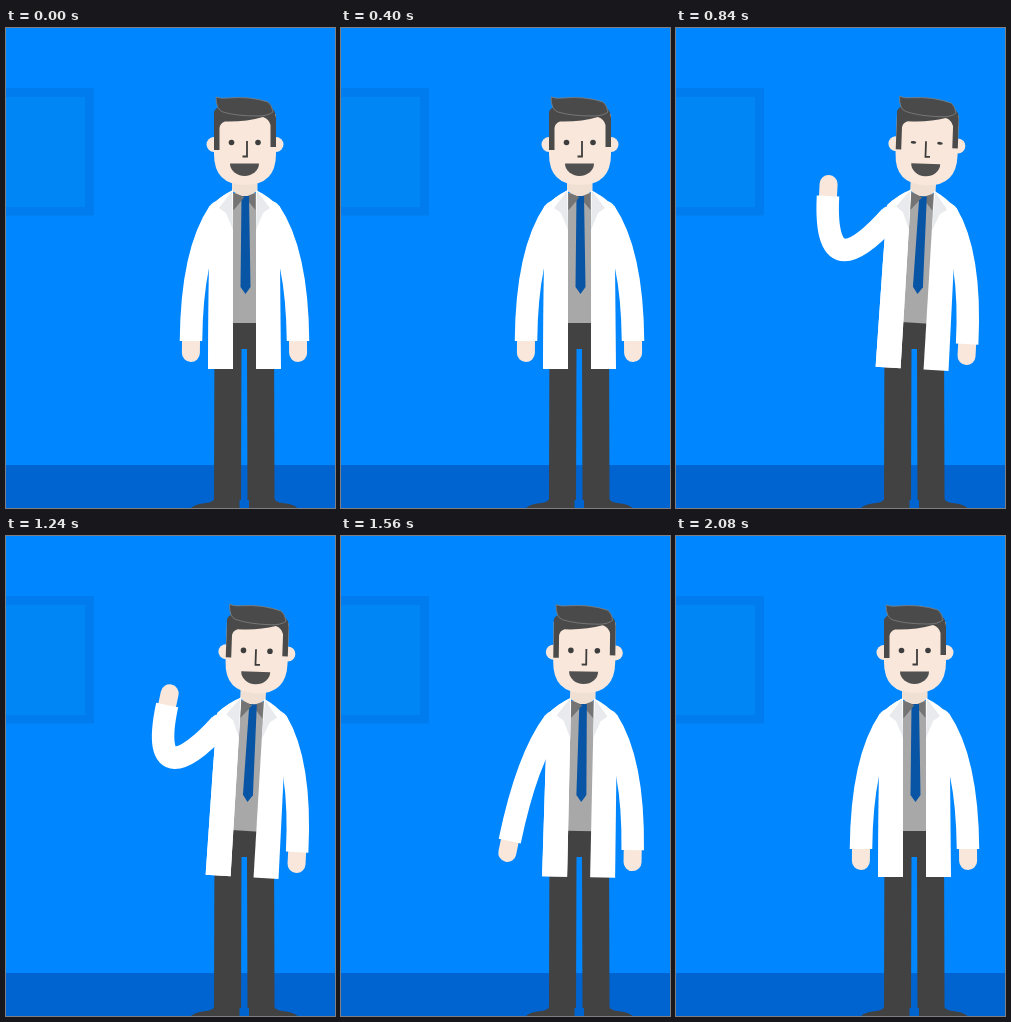
Recreate the animation shown at these times as an HTML page. Size 329 by 480 pixels, loop 2320 ms.

```html
<!DOCTYPE html>
<html lang="en">
<head>
<meta charset="utf-8">
<title>Waving doctor</title>
<style>
  html, body { margin: 0; width: 100%; height: 100%; overflow: hidden; background: #0087ff; }
  svg { display: block; }
  .sleeve { fill: none; stroke: #fff; stroke-width: 22.5; }
  .hand { fill: none; stroke: #f8e7da; stroke-width: 18; stroke-linecap: round; }
</style>
</head>
<body>
<svg width="329" height="480" viewBox="0 0 329 480">
  <defs>
    <g id="half">
      <path fill="#fff" d="M227 162Q213 169 204 179L203 235L202 341H227Z"/>
      <path fill="#e8eaed" d="M226 163L213 180L220 185L227 202Z"/>
      <path fill="#747474" d="M227.500 165L238.500 169L227.500 182Z"/>
    </g>
    <g id="leg" fill="#424242">
      <path d="M208.500 292H239V321H235.500L235 472H208Z"/>
      <path d="M185 480Q189 476 200 475Q207 474 208 471H233.500V480Z"/>
    </g>
  </defs>

  <rect width="329" height="480" fill="#0087ff"/>
  <rect y="60" width="88" height="127.500" fill="#007cee"/>
  <rect y="69" width="79" height="110" fill="#0086f5"/>
  <rect y="437" width="329" height="43" fill="#0064d0"/>

  <use href="#leg"/>
  <use href="#leg" transform="translate(476.500) scale(-1 1)"/>

  <g id="body">
    <path fill="#a8a8a8" d="M225 165H253V295H225Z"/>
    <path fill="#f0e0d4" d="M226 145H251.500V163L239 170L226 163Z"/>
    <g id="rightArm" transform="translate(477) scale(-1 1)"></g>
    <use href="#half"/>
    <use href="#half" transform="translate(477) scale(-1 1)"/>
    <path fill="#0854a5" d="M235.500 168H243L244.500 259L239.500 266L234.500 259Z"/>

    <g id="head">
      <g fill="#f8e7da">
        <circle cx="208" cy="116.500" r="7.500"/>
        <circle cx="270" cy="116.500" r="7.500"/>
        <path d="M208 86V126Q208 157 239 157Q270 157 270 126V86Z"/>
      </g>
      <path fill="#4a4a4a" d="M208 122V84Q209 80 214 79H264Q270 82 270 90V119H264.500V97Q263 91 257 89Q240 94 219 93.500Q214 95 213.500 100V122Z"/>
      <path fill="#4a4a4a" stroke="#808080" stroke-width=".8" d="M210 69Q215 71 222 70Q244 68 262 74Q266 77 267 84Q262 88 252 88Q230 88 217 84Q210 82 210 69Z"/>
      <g fill="#3d3d3d">
        <ellipse class="eye" cx="225.500" cy="114.500" rx="2.800" ry="2.800"/>
        <ellipse class="eye" cx="252" cy="114.500" rx="2.800" ry="2.800"/>
      </g>
      <path id="nose" fill="none" stroke="#3d3d3d" stroke-width="1.800"/>
      <path fill="#505050" d="M224 135.500H253A14.500 12.500 0 0 1 224 135.500Z"/>
    </g>
  </g>
  <g id="leftArm"></g>
  <use id="lapel" href="#half"/>
</svg>

<script>
const LOOP = 2320;
const $ = id => document.getElementById(id);
const clamp = x => Math.min(1, Math.max(0, x));
const smooth = x => (x = clamp(x), x * x * (3 - 2 * x));

// Arm curve: [lift, shoulder, control, control, wrist]
const poses = [
  [0, 213, 184, 194, 212, 185.5, 255, 185, 313],
  [.37, 213, 186, 193, 213, 179, 255, 168.5, 305],
  [.58, 213, 188, 190, 220, 174, 242, 138, 246],
  [.75, 213, 188, 190, 225, 150, 243, 129, 208],
  [1, 214, 189, 180, 227, 148, 246, 152, 168]
];
// Change of the raised arm for one unit of wave
const swing = [0, 0, 0, 0, -3, -1, 9, 1];

function armPose(lift, wave) {
  const i = Math.max(1, poses.findIndex(p => p[0] >= lift));
  const a = poses[i - 1], b = poses[i];
  const k = (lift - a[0]) / (b[0] - a[0]);
  return swing.map((s, j) => a[j + 1] + (b[j + 1] - a[j + 1]) * k + s * wave);
}

function drawArm(group, [sx, sy, ax, ay, bx, by, x, y]) {
  const len = Math.hypot(x - bx, y - by) / 12;
  const dx = (x - bx) / len, dy = (y - by) / len;
  group.innerHTML =
    `<path class="hand" d="M${x} ${y}l${dx} ${dy}"/>` +
    `<circle cx="${sx}" cy="${sy}" r="11" fill="#fff"/>` +
    `<path class="sleeve" d="M${sx} ${sy}C${ax} ${ay} ${bx} ${by} ${x} ${y}"/>`;
}

function draw(t) {
  const lift = smooth((t - 500) / 325) - smooth((t - 1360) / 340);
  const waving = t > 840 && t < 1480 ? 1 - Math.cos((t - 840) / 320 * 2 * Math.PI) : 0;
  drawArm($("leftArm"), armPose(clamp(lift), waving * clamp((lift - .75) * 4)));

  const lean = `rotate(${3.4 * lift} 240 300)`;
  $("body").setAttribute("transform", lean);
  $("lapel").setAttribute("transform", lean);
  // The head stays more upright than the body
  $("head").setAttribute("transform", `translate(${lift}) rotate(${-1.4 * lift} 239 116)`);

  const turn = clamp((lift - .6) / .4);
  const nx = 241 - 3 * turn;
  $("nose").setAttribute("d", `M${nx} 113V128.500H${236.5 + 6 * turn}`);

  const open = Math.min(1, .1 + Math.abs(t - 865) / 60);
  for (const eye of document.querySelectorAll(".eye")) eye.setAttribute("ry", 2.8 * open);
}

drawArm($("rightArm"), armPose(0, 0));
const start = performance.now();
function tick() {
  draw((performance.now() - start) % LOOP);
  requestAnimationFrame(tick);
}
tick();
</script>
</body>
</html>
```
